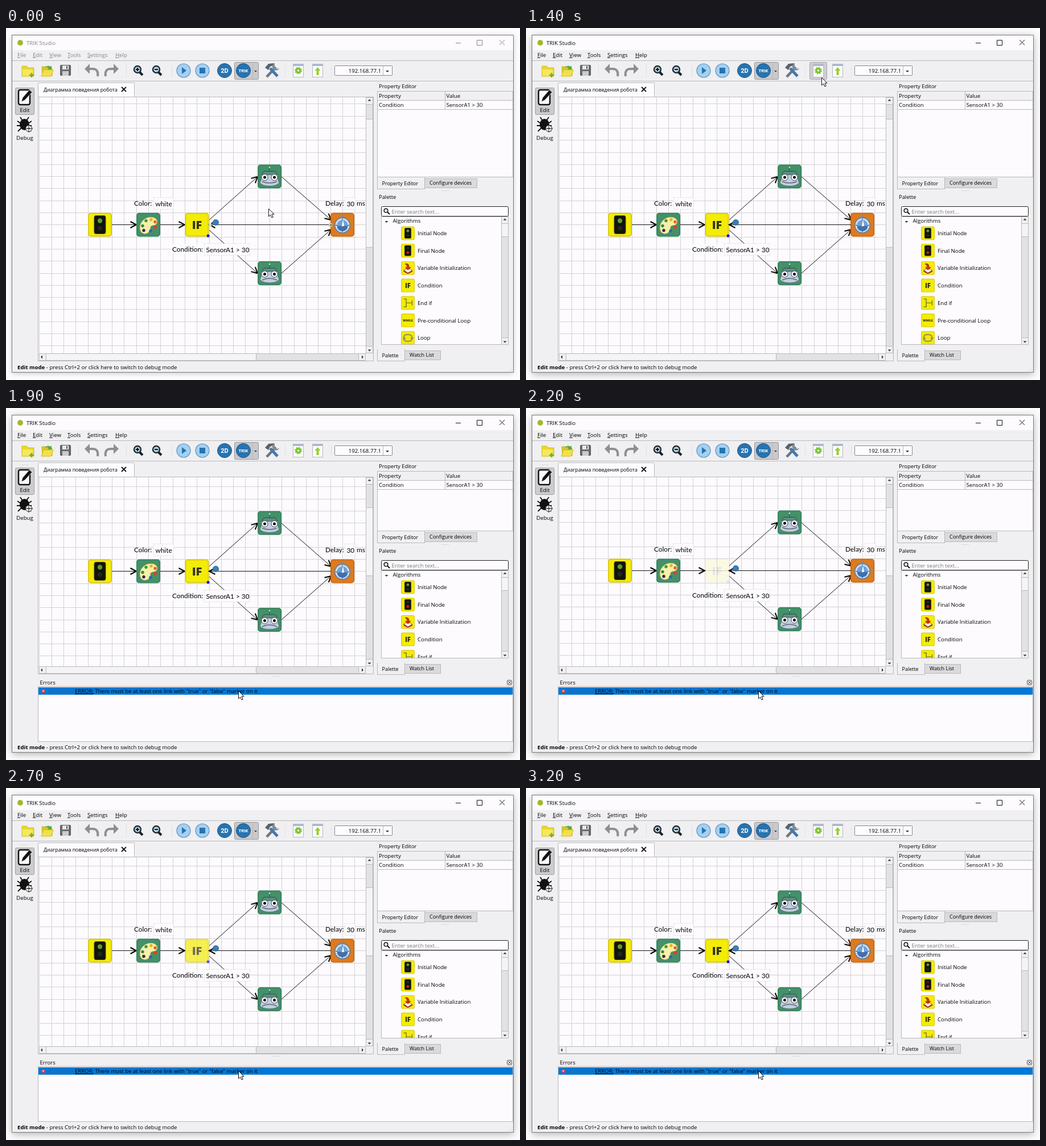
Animation, 903 px wide and 620 px high, one loop 4.2 s. Source, as an HTML page:

```html
<!DOCTYPE html>
<html lang="en">
<head>
<meta charset="utf-8">
<title>Diagram check</title>
<style>
html, body { margin: 0; width: 100%; height: 100%; overflow: hidden; background: #fdfcfd; }
svg { display: block; width: 903px; height: 620px; }
text { font: 500 9.65px "Open Sans", "Noto Sans", sans-serif; fill: #000; white-space: pre; }
.label { font: 11.8px Lato, sans-serif; }
.bold { font-weight: 700; }
.title { font-size: 9.4px; }
.tab { font-size: 9px; }
.message { font-size: 9.5px; }
.line { fill: none; stroke: #b9b8ba; }
.grid { stroke: #d2d1d4; shape-rendering: crispEdges; }
.link { fill: none; stroke: #111; stroke-width: 1; }
.head { fill: none; stroke: #000; stroke-width: 2; }
.frame { filter: drop-shadow(0 2px 7px rgba(0,0,0,.32)); }
.controls { fill: none; stroke: #111; }
.inactive .frame { filter: drop-shadow(0 1px 5px rgba(0,0,0,.22)); }
.inactive .chrome text { fill: #858487; }
.inactive .controls { stroke: #858487; }
</style>
</head>
<body>
<svg id="stage" viewBox="0 0 903 620"></svg>
<script>
const LOOP = 4200, CELL = 21.3, WHITE = '#fdfbfe', PANEL = '#f0eff1', TROUGH = '#e2e1e4';

const rect = (x, y, w, h, fill, extra = '') =>
  `<rect x="${x}" y="${y}" width="${w}" height="${h}" fill="${fill}" ${extra}/>`;
const box = (x, y, w, h, fill, stroke = '#b9b8ba', rx = 0) =>
  rect(x + .5, y + .5, w - 1, h - 1, fill, `stroke="${stroke}" rx="${rx}"`);
const circle = (x, y, r, fill, extra = '') => `<circle cx="${x}" cy="${y}" r="${r}" fill="${fill}" ${extra}/>`;
const path = (d, extra = 'fill="none" stroke="#111"') => `<path d="${d}" ${extra}/>`;
const text = (x, y, s, extra = '') => `<text x="${x}" y="${y}" ${extra}>${s}</text>`;
const group = (x, y, body, extra = '') => `<g transform="translate(${x} ${y})" ${extra}>${body}</g>`;
const line = (d) => path(d, 'class="line"');
const dots = (x, y, n, dx, dy) => Array.from({ length: n }, (_, i) =>
  rect(x + i * dx, y + i * dy, 1, 1, '#c4c3c5')).join('');
const triangle = (x, y, dx, dy, r = 3) => path(dx
  ? `M${x + dx * r} ${y}l${-dx * r} ${-r}v${2 * r}z`
  : `M${x} ${y + dy * r}l${-r} ${-dy * r}h${2 * r}z`, 'fill="#333"');

// Block icons, each in a 42 x 42 box
const tile = (fill, edge) => rect(1, 1, 40, 40, fill, `stroke="${edge}" stroke-width="2" rx="4"`);
const yellow = tile('#f3ec06', '#dccb12');
const green = tile('#449069', '#3a8560');
const yellowWord = (s, size, y) => yellow +
  text(21, y, s, `text-anchor="middle" style="font:800 ${size}px 'Open Sans',sans-serif;fill:#34331c"`);
const traffic = (top, bottom) => yellow +
  rect(11, 5, 20, 32, '#11130d', 'rx="3" stroke="#45451c"') +
  circle(21, 14, 4.2, top) + circle(21, 27, 4.2, bottom);
const icons = {
  initial: traffic('#5f9a2f', '#232520'),
  final: traffic('#232520', '#d01b22'),
  variable: yellow + path('M8 27l14-5 13 6-14 8z', 'fill="#f5f2e6" stroke="#6b3012"') +
    path('M8 27v5l13 7 14-7v-4l-14 8z', 'fill="#a8281c"') +
    path('M12 8q13-4 13 11h5l-9 8-8-8h6q0-8-7-11z', 'fill="#df2a1c" stroke="#7d150c"'),
  condition: yellowWord('IF', 20, 28),
  endIf: yellow + path('M8 9h8v24H8M16 21h18M34 13v16', 'fill="none" stroke="#8a8d1c" stroke-width="3"'),
  while: yellowWord('WHILE', 9.5, 25),
  loop: yellow + path('M9 24q-3-13 12-13 14 0 13 11M33 19q3 13-12 13-13 0-13-10',
    'fill="none" stroke="#9b984b" stroke-width="4"') + path('M4 25l6-8 6 8zM28 20l6 8 5-8z', 'fill="#9b984b"'),
  paint: green + path('M8 33C2 20 14 6 28 8c12 2 10 14 2 14-8 1-4 5-7 10-3 6-12 6-15 1z',
    'fill="#f7efaa" stroke="#d8c66d"') + circle(11, 23, 2.7, '#2e8e3e') + circle(17, 14, 2.7, '#3c9a37') +
    circle(26, 12, 2.7, '#e4b721') + circle(33, 16, 2.7, '#e8641e') + circle(13, 31, 2.7, '#3b2352') +
    circle(33, 25, 3, '#d94324') + circle(25, 32, 2.7, '#2b66a8'),
  timer: tile('#e07a1c', '#d06c12') + circle(21, 22, 13.5, '#cfdcea', 'stroke="#6d8099" stroke-width="2"') +
    circle(21, 22, 9.5, '#6ea3d6') + path('M11.5 23a9.5 9.5 0 0 0 19 0z', 'fill="#416fae"') +
    rect(18, 4, 6, 4, '#7c8ca0') + path('M21 10v3M21 31v3M9 22h3M30 22h3', 'stroke="#33485f"') +
    path('M20 24l2-12 2 11z', 'fill="#fff"')
};
const robot = (mouth) => green +
  path('M11 12h20l4 6H7z', 'fill="#5d8d83" stroke="#244f45"') + path('M21 5v7', 'stroke="#2a5a4c"') +
  circle(21, 5, 1.2, '#d9efdf') +
  path('M6 18h30v9l2 5q-4 6-17 6T4 32l2-5z', 'fill="#c2cddd" stroke="#4f6675"') +
  [12.5, 29.5].map(x => circle(x, 22.5, 5.6, '#f6f8fb', 'stroke="#3e4955"') + circle(x, 22.5, 2.5, '#111')).join('') +
  path(mouth, 'fill="none" stroke="#5c6b7c" stroke-width="1.4"');

function arrow(x1, y1, x2, y2) {
  const angle = Math.atan2(y2 - y1, x2 - x1) * 180 / Math.PI;
  return path(`M${x1} ${y1}L${x2} ${y2}`, 'class="link"') +
    `<path class="head" d="M-10.5 -5.5L0 0L-10.5 5.5" transform="translate(${x2} ${y2}) rotate(${angle})"/>`;
}
const field = (x, y, w, s) => rect(x, y, w, 21, WHITE, 'stroke="#c3c2c5" stroke-dasharray="1 2"') +
  text(x + 3, y + 15, s, 'class="label"');
const caption = (x, y, s) => text(x, y, s, 'class="label"');

function diagram() {
  let grid = '';
  for (let i = -5; i < 24; i++) grid += `M${144 + i * CELL} 60V660`;
  for (let i = -12; i < 16; i++) grid += `M50 ${325.5 + i * CELL}H640`;
  const node = (x, y, icon, cls = '') => group(x, y, icon, `class="${cls}"`);
  return path(grid, 'class="grid"') +
    arrow(186, 346.5, 229, 346.5) + arrow(271, 346.5, 314, 346.5) +
    arrow(357, 338, 442, 262) + arrow(357, 356, 442, 432) +
    arrow(484, 262, 571, 338) + arrow(484, 432, 571, 355) +
    caption(225, 313, 'Color:') + field(259.5, 298.5, 35, 'white') +
    caption(561, 313, 'Delay:') + field(595.5, 298.5, 18, '30') + caption(616, 313, 'ms') +
    rect(290, 380, 58, 18, WHITE, 'opacity=".75"') +
    caption(292, 394, 'Condition:') + field(348.5, 379.5, 80, 'SensorA1 &gt; 30') +
    node(144, 325.5, icons.initial) + node(229, 325.5, icons.paint) +
    node(314.5, 325.5, icons.condition + circle(40.5, 40.5, 2.5, '#1010f0'), 'flash') +
    node(442, 240.5, robot('M8 30q13 5 26 0')) + node(442, 411, robot('M8 33q13-6 26 0')) +
    node(570, 325.5, icons.timer) + arrow(571, 346.5, 357, 346.5) +
    circle(368.5, 342.5, 5, '#3c7eb6', 'stroke="#25669c"') +
    `<g class="ends">${rect(567, 344, 6, 6, '#b9d5b7') + rect(570, 346, 2, 2, '#333') +
      rect(356, 344, 5, 6, '#c7dac5')}</g>` +
    `<g class="hover">${rect(442, 240, 43, 44, '#fff', 'opacity=".22" rx="4"') +
      rect(441, 239, 45, 46, 'none', 'stroke="#a5c9b5" stroke-width="2" rx="5"')}</g>`;
}

function verticalScroll(x, top, bottom, from, to) {
  return box(x, top, 13, bottom - top, TROUGH) + box(x, top, 13, 13, PANEL) +
    box(x, bottom - 13, 13, 13, PANEL) + box(x, from, 13, to - from, '#f4f3f5') +
    triangle(x + 6.5, top + 6.5, 0, -1) + triangle(x + 6.5, bottom - 6.5, 0, 1);
}
function tabs(y, first, firstWidth, second, secondWidth) {
  return box(652, y, firstWidth, 21, PANEL) + rect(653, y, firstWidth - 2, 1, PANEL) +
    box(652 + firstWidth - 1, y + 2, secondWidth, 17, '#dad9db') +
    text(660.5, y + 14, first, 'class="tab"') + text(652 + firstWidth + 8, y + 13, second, 'class="tab"');
}

// The work area with the error dock open or closed
function workArea(open) {
  const id = open ? 'opened' : 'closed';
  const bottom = open ? 455 : 573, shift = open ? -46 : 0;
  const listTop = 332 + shift, listBottom = open ? 441 : 558;
  const items = [['Initial Node', 'initial'], ['Final Node', 'final'], ['Variable Initialization', 'variable'],
    ['Condition', 'condition'], ['End if', 'endIf'], ['Pre-conditional Loop', 'while'], ['Loop', 'loop']];
  const list = items.map(([name, icon], i) => {
    const y = 361.5 + shift + i * 30.7;
    return group(694, y - 12, `<g transform="scale(.57)">${icons[icon]}</g>`) + text(723, y + 3.5, name);
  }).join('');
  const errors = dots(468, 472, 7, 2, 0) + text(59.5, 486.5, 'Errors') + box(880, 479, 9, 9, WHITE, '#444', 2) +
    path('M882 481l5 5M887 481l-5 5') + box(56, 490, 835, 98, WHITE) +
    `<g id="row">${rect(57, 492, 833, 13, '#0078d7')}</g>` +
    circle(65.5, 498.5, 3.6, '#c5455a') + path('M64 497l3 3M67 497l-3 3', 'stroke="#fff"') +
    text(74, 502, '[21:55:16]', 'class="message" style="fill:#2b6699"') +
    text(121, 502, 'ERROR:', 'class="message" text-decoration="underline"') +
    text(156.5, 502, 'There must be at least one link with "true" or "false" marker on it', 'class="message"');
  return `<g id="${id}">
    <clipPath id="${id}View"><rect x="58" y="122" width="574" height="${bottom - 122}"/></clipPath>
    <clipPath id="${id}List"><rect x="660" y="${listTop}" width="210" height="${listBottom - listTop - 1}"/></clipPath>
    ${box(56, 121, 590, bottom - 107, WHITE)}
    <g clip-path="url(#${id}View)"><g class="scene">${diagram()}</g></g>
    ${open ? verticalScroll(632, 122, bottom, 175, 296) : verticalScroll(632, 122, bottom, 160, 387)}
    ${box(58, bottom, 574, 13, TROUGH) + box(58, bottom, 382, 13, '#f4f3f5') + box(58, bottom, 13, 13, PANEL) +
      box(619, bottom, 13, 13, PANEL) + triangle(64, bottom + 6.5, -1, 0) + triangle(625, bottom + 6.5, 1, 0) +
      rect(632, bottom, 13, 13, PANEL)}
    ${text(655, 106, 'Property Editor', 'class="title"') + box(652, 111, 239, 152 + shift, WHITE) + rect(653, 112, 237, 15, PANEL) +
      line('M652 127.5H890M652 143.5H890M771.5 112V143') + text(655, 123, 'Property') + text(773.5, 123, 'Value') +
      text(655, 139, 'Condition') + text(773.5, 139, 'SensorA1 &gt; 30')}
    ${tabs(263 + shift, 'Property Editor', 84, 'Configure devices', 93) + dots(765, 286 + shift, 7, 2, 0)}
    ${text(655, 301 + shift, 'Palette', 'class="title"') + box(659, listTop, 224, listBottom - listTop, WHITE)}
    ${box(659, 314 + shift, 224, 18, WHITE, '#222', 2) + circle(667.5, 321.5 + shift, 3.3, 'none', 'stroke="#111" stroke-width="1.5"') +
      path(`M670 ${324 + shift}l4 4`, 'stroke="#111" stroke-width="2"') +
      text(677.5, 326.5 + shift, 'Enter search text...', 'style="fill:#777"')}
    <g clip-path="url(#${id}List)">${triangle(668.5, 340 + shift, 0, 1) + text(679.5, 343 + shift, 'Algorithms') + list}</g>
    ${verticalScroll(870, listTop, listBottom, listTop + 12, listTop + 36)}
    ${tabs(listBottom + 8, 'Palette', 49, 'Watch List', 64)}
    ${open ? errors : ''}</g>`;
}

function toolbar() {
  const word = (x, s, size) => circle(x, 75, 12.5, '#2773b0', 'stroke="#18588d"') +
    text(x, 75 + size * .36, s, `text-anchor="middle" style="font:700 ${size}px Roboto,sans-serif;fill:#fff"`);
  const lens = (x, sign) => path(`M${x + 3} 78l5 5`, 'stroke="#17202a" stroke-width="4"') +
    circle(x - 1, 73, 6, '#b9cfdf', 'stroke="#1c2933" stroke-width="2.4"') +
    path(`M${x - 4} 73h6${sign}`, 'stroke="#111" stroke-width="2"');
  const round = (x) => circle(x, 75, 12, '#a4d0f1', 'stroke="#5d93bf" stroke-width="1.2"');
  const page = (x) => box(x, 63, 19, 24, '#fbfbfc', '#b9bac0') + rect(x + 1, 64, 17, 3, '#a9b9da');
  const undo = path('M143 72h9q11 0 9 13', 'fill="none" stroke="#8e8f92" stroke-width="4"') +
    path('M138 72l9-9v18z', 'fill="#8e8f92"');
  return [127, 211, 291, 490, 571].map(x => dots(x, 66, 7, 0, 3)).join('') +
    path('M28 67h8l3 3h10v15H28z', 'fill="#e9d72e" stroke="#d1bf2a"') + rect(29, 73, 18, 11, '#f4e95b') +
    path('M45 79v8M41 83h8', 'stroke="#70ac35" stroke-width="2.4"') +
    path('M63 68h7l2 3h9v13H64z', 'fill="#d7c728" stroke="#c5b428"') + path('M62 85l4-11h17l-4 11z', 'fill="#f2e14a" stroke="#d1bf2a"') +
    path('M68 70q5-6 10-2l2-2v7h-7l2-2q-3-3-7-1z', 'fill="#5aaa3b"') +
    box(95, 65, 19, 19, '#686b6e', '#55575a', 1) + rect(99, 66, 11, 7, '#e6e7e8') + rect(99, 76, 11, 8, '#c9cbcd') + rect(106, 67, 2, 5, '#55575a') +
    undo + `<g transform="translate(336 0) scale(-1 1)">${undo}</g>` +
    lens(232, 'M231 70v6') + lens(265, '') + round(312) + path('M309 69v12l8-6z', 'fill="#2773b0"') +
    round(345) + rect(340, 70, 10, 10, '#2773b0') + word(384, '2D', 11) +
    box(401, 60, 43, 31, '#c9c8cb', '#98979b', 2) + line('M433.5 61V90') + word(417, 'TRIK', 7.8) + triangle(438.5, 75, 0, 1, 2.5) +
    path('M458 86l16-17', 'stroke="#6b7580" stroke-width="4.5"') + path('M477 85l-13-14', 'stroke="#4379ad" stroke-width="5"') +
    path('M455 70l6-7 10-1-2 4-5 2-3 6z', 'fill="#59626b"') + path('M472 62a6.5 6.5 0 1 0 8 9l-4 1-4-4z', 'fill="#7f8b97"') +
    `<g id="upload">${box(498, 60, 31, 31, '#cfced1', '#a5a4a8', 2)}</g>` +
    page(504) + circle(513.5, 75, 3.5, 'none', 'stroke="#7cc62e" stroke-width="3.5"') +
    circle(513.5, 75, 5.5, 'none', 'stroke="#7cc62e" stroke-width="2" stroke-dasharray="2 2.3"') +
    page(538) + path('M547.5 69l5 6h-3v8h-4v-8h-3z', 'fill="#98cf2c"') +
    box(577, 66, 102, 18, WHITE, '#88878b', 1) + line('M662.5 67V83') + triangle(670, 75, 0, 1) +
    text(659, 79, '192.168.77.1', 'text-anchor="end"');
}

function windowFrame() {
  const menu = [[20, 'File'], [47, 'Edit'], [76, 'View'], [108, 'Tools'], [143, 'Settings'], [192, 'Help']];
  return rect(11, 13, 880, 594, PANEL, 'class="frame"') + box(10, 12, 882, 595, PANEL, '#77767a') +
    rect(11, 13, 880, 26, WHITE) + `<g class="chrome">${circle(25, 26, 5, '#a2b82d') + text(36, 29.5, 'TRIK Studio') +
      menu.map(([x, s]) => text(x, 50.8, `<tspan text-decoration="underline">${s[0]}</tspan>${s.slice(1)}`)).join('')}</g>` +
    path('M790 26.5h9M827.5 21.5h9v9h-9zM867 21l9 9M876 21l-9 9', 'class="controls"') +
    line('M11 57.5H891M11 93.5H891') + toolbar() + dots(26, 100, 7, 2, 0) +
    box(16, 105, 34, 48, '#cccbce', '#a09fa3', 2) +
    rect(22, 109, 20, 26, '#fbfbfc', 'stroke="#111" stroke-width="2.4" rx="3"') +
    path('M27 130l2-7 12-14 5 4-13 14z', 'fill="#111" stroke="#fff" stroke-width=".7"') +
    text(33, 147.5, 'Edit', 'text-anchor="middle"') + text(33, 196.5, 'Debug', 'text-anchor="middle"') +
    path('M25 157l4 6M40 157l-4 6M20 164l6 4M45 164l-6 4M19 172h26M21 182l6-6M40 178l4 4', 'stroke="#111" stroke-width="1.8"') +
    '<ellipse cx="32.5" cy="170" rx="8.5" ry="10" fill="#111"/>' +
    circle(40, 177, 5.5, '#f7f7f8', 'stroke="#222"') + path('M33 177h14M40 170v14M37 177h6', 'stroke="#222"') +
    box(56, 96, 170, 27, WHITE, '#b9b8ba', 1) + text(66, 112, 'Диаграмма поведения робота', 'style="font-size:8.8px"') +
    path('M203 104l8 8M211 104l-8 8', 'stroke="#111" stroke-width="1.8"') +
    text(20, 601, '<tspan class="bold">Edit mode</tspan> - press Ctrl+2 or click here to switch to debug mode') +
    dots(888, 598, 3, 0, 3) + dots(885, 601, 2, 0, 3) + rect(882, 604, 1, 1, '#bdbcbe');
}

const stage = document.getElementById('stage');
stage.innerHTML = windowFrame() + workArea(false) + workArea(true) + `<g id="pointer">
  <path id="arrow" d="M.5 .5V14L3.6 11L5.9 16L8.2 15L6 10H10.2Z" fill="#fff" stroke="#111"/>
  <path id="hand" d="M-1.5 1q1.5-2 3 0v6q2-1 3 .5 2-1 3 .7 2-.5 2.5 1.3v4L8.5 18H0L-5 11q0-3 3.5 0z"
    fill="#fff" stroke="#111"/></g>`;

const find = (id) => document.getElementById(id);
const show = (el, on) => { el.style.display = on ? '' : 'none'; };
const all = (selector) => [...stage.querySelectorAll(selector)];

// Keys are [time, ...values]; values are interpolated in between
function sample(keys, t) {
  const next = keys.findIndex(key => key[0] > t);
  if (next < 0) return keys[keys.length - 1].slice(1);
  if (!next) return keys[0].slice(1);
  const a = keys[next - 1], b = keys[next], k = (t - a[0]) / (b[0] - a[0]);
  return a.slice(1).map((v, i) => v + (b[i + 1] - v) * k);
}
const pointerKeys = [[0, 461, 318], [999, 461, 318], [1000, 467, 241], [1100, 476, 205], [1300, 516, 96],
  [1400, 519, 87], [1600, 519, 87], [1800, 412, 490], [1900, 408, 498]];
const flashKeys = [[2000, 1], [2200, .1], [2700, .7], [3200, 1]];

function render(now) {
  const t = Math.floor(now % LOOP / 100) * 100;
  const open = t >= 1600, hovering = t === 1000;
  stage.classList.toggle('inactive', t < 1300);
  show(find('closed'), !open);
  show(find('opened'), open);
  show(find('row'), t >= 1800);
  show(find('upload'), t >= 1300 && t < 1600);
  show(find('hand'), hovering);
  show(find('arrow'), !hovering);
  all('.hover').forEach(el => show(el, hovering));
  all('.ends').forEach(el => show(el, t < 1000));
  const scroll = !open ? 0 : t < 2000 ? -59 : -60;
  all('.scene').forEach(el => el.setAttribute('transform', `translate(0 ${scroll})`));
  all('.flash').forEach(el => el.setAttribute('opacity', sample(flashKeys, t)[0]));
  find('pointer').setAttribute('transform', `translate(${sample(pointerKeys, t).map(Math.round).join(' ')})`);
}

const start = performance.now();
function tick() {
  render(performance.now() - start);
  requestAnimationFrame(tick);
}
tick();
</script>
</body>
</html>
```
